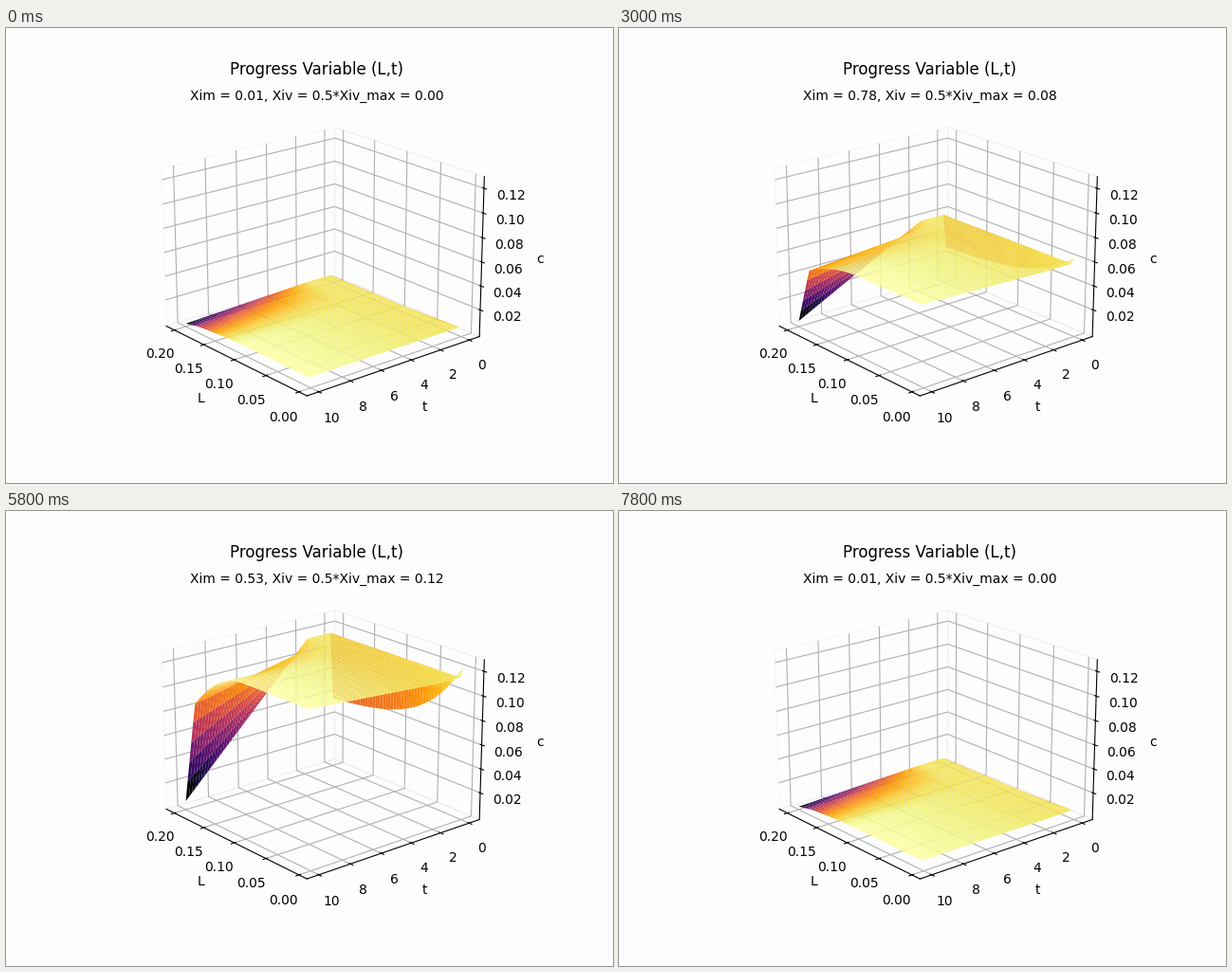
A matplotlib script for the animation above (8 s loop, 640 by 480 pixels).

```python
import numpy as np
import matplotlib.pyplot as plt
from matplotlib.animation import FuncAnimation

STEPS = 20
BG = "#fdfdfd"

u, T = np.meshgrid(np.linspace(0, 1, 50), np.linspace(0, 10, 50),
                   indexing="ij")
L = 0.0025 + 0.197 * u


def ramp(x, start, end):
    return np.clip((x - start) / (end - start), 0, 1)


def progress(mean):
    """Progress variable over the (L, t) grid for one mean mixture."""
    peak = (0.61 - 0.385 * mean**2) * mean**1.03 * (1 - mean)
    # Loss at the last time: a soft bend in L, then a steep drop at the end
    bend = 0.2 + 0.3 * (1 - mean)**2
    late = bend * ramp(u, 0.5, 0.9)**2 + (0.96 - bend) * ramp(u, 0.9, 1)
    early = 0.065
    loss = early + (late - early) * ramp(T, 1.8, 10)
    start = 0.55 * (1 - np.exp(-u / 0.3))
    return peak * (1 - np.where(T == 0, start, loss))


def padded(lo, hi, margin=0.0):
    """Limits with a data margin and the usual 3D view margin."""
    pad = margin * (hi - lo)
    lo, hi = lo - pad, hi + pad
    view = (hi - lo) / 48
    return lo - view, hi + view


fig = plt.figure(figsize=(6.4, 4.8), dpi=100, facecolor=BG)
ax = fig.add_subplot(projection="3d", facecolor=BG)
ax.view_init(elev=20, azim=140)
ax.set_title("Progress Variable (L,t)")
ax.set(xlabel="L", ylabel="t", zlabel="c")
ax.set_xlim(*padded(L.min(), L.max(), 0.05))
ax.set_ylim(*padded(0, 10, 0.05))
ax.set_zlim(*padded(0.0001, 0.1267))
ax.set_xticks(np.arange(0, 0.21, 0.05))
ax.set_yticks(np.arange(0, 11, 2))
ax.set_zticks(np.arange(0.02, 0.13, 0.02))
for axis in (ax.xaxis, ax.yaxis, ax.zaxis):
    axis.pane.fill = False
caption = ax.text2D(0.5, 0.95, "", transform=ax.transAxes, ha="center")

surfaces = []


def draw(frame):
    step = min(frame, 2 * STEPS - 1 - frame)  # forth and back
    mean = 0.01 + 0.98 * step / (STEPS - 1)
    var = 0.5 * mean * (1 - mean)
    while surfaces:
        surfaces.pop().remove()
    surfaces.append(ax.plot_surface(L, T, progress(mean), cmap="inferno",
                                    linewidth=0, antialiased=True))
    caption.set_text(f"Xim = {mean:.2f}, Xiv = 0.5*Xiv_max = {var:.2f}")
    return surfaces + [caption]


anim = FuncAnimation(fig, draw, frames=2 * STEPS, interval=200,
                     init_func=lambda: draw(0), repeat=True, repeat_delay=0)
plt.show()
```
